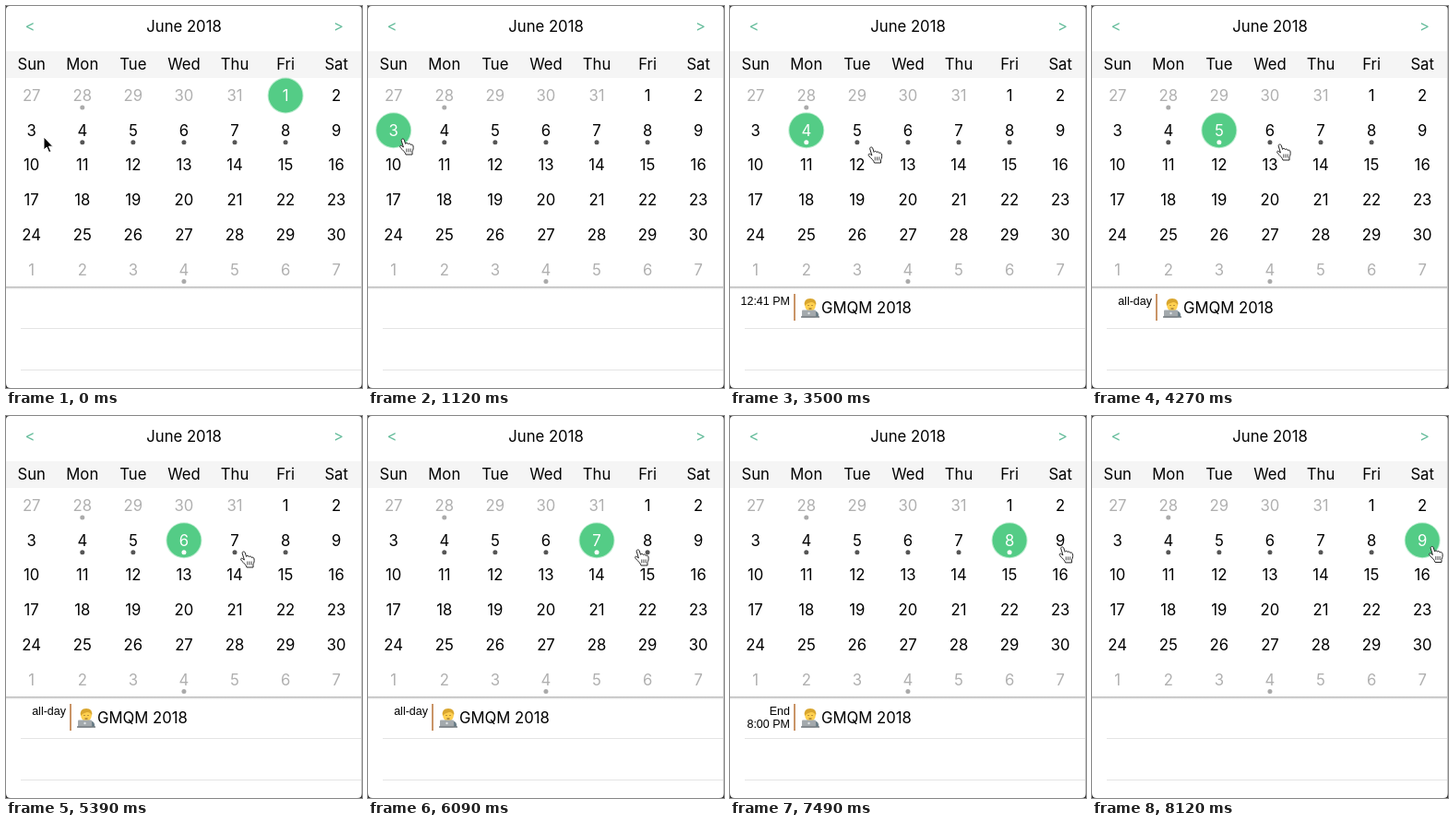
Recreate the animation shown at these times as an HTML page. Size 386 px wide and 414 px high, loop 8.19 s.

```html
<!DOCTYPE html>
<html lang="en">
<head>
<meta charset="utf-8">
<title>Calendar</title>
<style>
html, body { margin: 0; width: 100%; height: 100%; overflow: hidden; background: #fff; }
svg { display: block; }
text { font-family: Inter, Roboto, sans-serif; font-size: 16.7px; text-anchor: middle; }
#time text { font-family: "Liberation Sans", Arial, sans-serif; font-size: 12.5px; text-anchor: end; }
</style>
</head>
<body>
<svg id="stage" width="386" height="414" viewBox="0 0 386 414">
  <defs>
    <linearGradient id="shade" x2="0" y2="1">
      <stop stop-color="#b0b0b0"/><stop offset="1" stop-color="#fff"/>
    </linearGradient>
  </defs>
  <rect width="386" height="414" fill="#fff"/>
  <rect y="49" width="386" height="29" fill="#f5f5f5"/>
  <rect y="304" width="386" height="3" fill="url(#shade)"/>
  <path d="M16 349.5H386M16 394.5H386" stroke="#e4e4e4"/>
  <text x="193" y="28">June 2018</text>
  <g fill="#66bd9c"><text x="26" y="28">&lt;</text><text x="360.5" y="28">&gt;</text></g>
  <circle id="mark" r="18.5" fill="#54cc86" stroke="#54cc86" stroke-opacity=".4" stroke-width="2"/>
  <g id="days"></g>
  <g id="event">
    <rect x="69" y="312" width="2" height="29" fill="#c99467"/>
    <g id="time"></g>
    <g id="worker">
      <path d="M78 337V334Q79 329.5 87 329.5T96 334V337Z" fill="#6c7f89"/>
      <ellipse cx="87" cy="324.5" rx="5.8" ry="6.5" fill="#ffd04f"/>
      <path d="M81 325Q79.500 317 87 317T93 325Q92 321 88 321Q83 322 81 325Z" fill="#d9a62e"/>
      <path d="M84.500 324.500h1M88.500 324.500h1M85.500 328h3" stroke="#765326"/>
      <rect x="78" y="329.5" width="15" height="8" rx="1" fill="#a3a9ad"/>
      <path d="M77 337H97" stroke="#747b81" stroke-width="1.500"/>
      <circle cx="85.500" cy="333" r="1.200" fill="#dfe3e6"/>
    </g>
    <text x="99" y="333" style="text-anchor:start">GMQM 2018</text>
  </g>
  <path d="M385.500 0V414" stroke="#c4c4c4"/>
  <path d="M0 409V414H5Q0 414 0 409ZM386 409V414H381Q386 414 386 409ZM0 4V0H4Q0 0 0 4ZM386 4V0H382Q386 0 386 4Z" fill="#333"/>
  <circle id="ring" fill="none" stroke="#000" stroke-opacity=".45" stroke-width="2"/>
  <g id="pointer" stroke-linejoin="round">
    <path id="arrow" d="M0 0V14L3.200 11L5.600 16.600L7.800 15.700L5.400 10.200H9.800Z" fill="#000" stroke="#fff"/>
    <g id="hand" fill="#fff" stroke="#222">
      <path d="M-1.800 1.800C-2.200 0 .4-.8 1.200 1L2.600 5.400C3.200 4 5 4 5.400 5.600C6.400 4.500 7.800 4.900 8.200 6.400C9.600 5.600 10.800 6.400 11 7.800C11.400 10 11 12 10 13.800V17H3C2.600 14.700-.4 12-2.600 9.800C-4.400 7.800-2.600 6.400-1.200 7.800L.4 9Z"/>
      <path d="M3.800 10.500V14.500M6 10.500V14.500M8.200 10.500V14.500" stroke-width=".8"/>
    </g>
  </g>
</svg>
<script>
const LOOP = 8190;
const el = id => document.getElementById(id);
const colX = c => 27.7 + 55.08 * c;
const rowY = r => 97 + 37.7 * r;

function add(parent, tag, attrs, content = "") {
  const node = document.createElementNS("http://www.w3.org/2000/svg", tag);
  for (const key in attrs) node.setAttribute(key, attrs[key]);
  node.textContent = content;
  parent.append(node);
  return node;
}

["Sun", "Mon", "Tue", "Wed", "Thu", "Fri", "Sat"].forEach((name, c) =>
  add(el("days"), "text", { x: colX(c), y: 69 }, name));

// Cell 5 is June 1; the cells around the month are dimmed.
const dotted = [1, 8, 9, 10, 11, 12, 38];
const cells = Array.from({ length: 42 }, (_, i) => {
  const x = colX(i % 7), y = rowY(Math.floor(i / 7));
  const dim = i < 5 || i > 34;
  const label = i < 5 ? 27 + i : i > 34 ? i - 34 : i - 4;
  return {
    x, y, dim,
    text: add(el("days"), "text", { x, y: y + 6 }, label),
    dot: dotted.includes(i) && add(el("days"), "circle", { cx: x, cy: y + 13, r: 2.5 })
  };
});

// [time, selected cell, time label lines]
const picks = [
  [0, 5, ""], [980, 7, ""], [2310, 8, "12:41 PM"], [3570, 9, "all-day"],
  [4550, 10, "all-day"], [5740, 11, "all-day"], [6790, 12, "End|8:00 PM"], [8050, 13, ""]
];
// [start, end, x, y]
const moves = [
  [70, 280, 38, 144], [1190, 1890, 99, 148], [2450, 3150, 153.5, 153],
  [3570, 4270, 204, 150], [4550, 5110, 252, 148], [5110, 5390, 258, 147],
  [5740, 6300, 309, 144], [6300, 6440, 312.5, 143.5], [6790, 7420, 359, 142],
  [7420, 7700, 369, 141.5]
];
// [start, radius]
const clicks = [[630, 23], [2100, 32], [3360, 32], [4340, 32], [5530, 32], [6650, 32], [7840, 32]];

function pointerAt(t) {
  let x = 41, y = 142;
  for (const [start, end, toX, toY] of moves) {
    const p = Math.min(1, Math.max(0, (t - start) / (end - start)));
    const k = p * p * (3 - 2 * p);
    x += (toX - x) * k;
    y += (toY - y) * k;
  }
  return [x, y];
}

let current;
function select(pick) {
  if (pick === current) return;
  current = pick;
  const [, chosen, label] = pick;
  cells.forEach(({ dim, text, dot }, i) => {
    text.setAttribute("fill", i === chosen ? "#fff" : dim ? "#b0b0b0" : "#000");
    if (dot) dot.setAttribute("fill", i === chosen ? "#fff" : dim ? "#aaa" : "#555");
  });
  el("mark").setAttribute("cx", cells[chosen].x);
  el("mark").setAttribute("cy", cells[chosen].y);
  el("event").style.display = label ? "" : "none";
  el("time").replaceChildren();
  label.split("|").forEach((line, i) =>
    add(el("time"), "text", { x: 65, y: 324 + 14 * i }, line));
}

function draw(now) {
  const t = now % LOOP;
  select(picks.findLast(([start]) => t >= start));
  const [x, y] = pointerAt(t);
  el("pointer").setAttribute("transform", `translate(${x} ${y})`);
  el("arrow").style.display = t < 140 ? "" : "none";
  el("hand").style.display = t < 140 ? "none" : "";
  const click = clicks.find(([start]) => t >= start && t < start + 140);
  el("ring").setAttribute("cx", x);
  el("ring").setAttribute("cy", y);
  el("ring").setAttribute("r", click ? click[1] : 0);
  requestAnimationFrame(draw);
}
requestAnimationFrame(draw);
</script>
</body>
</html>
```
